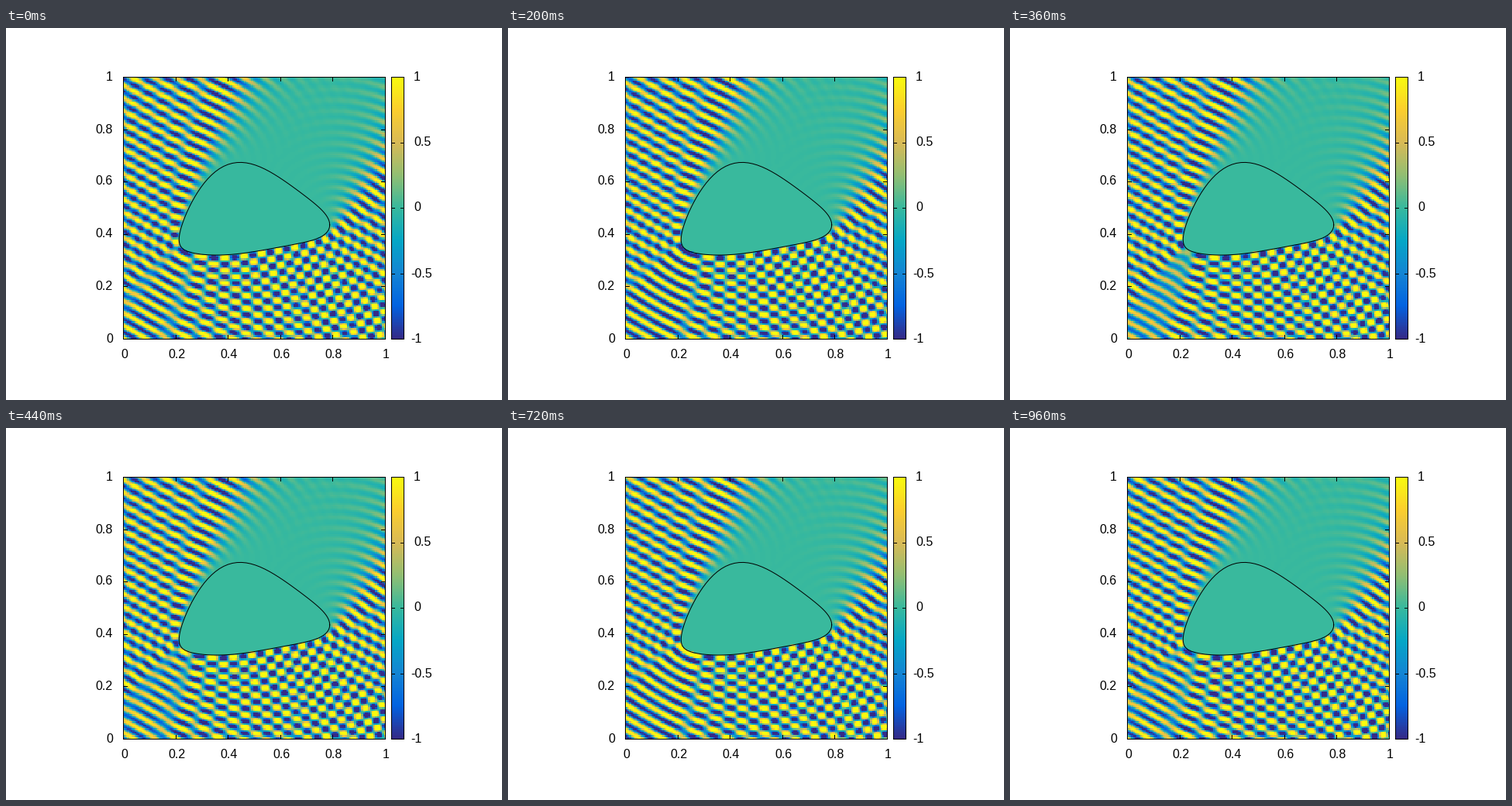
Recreate the animation shown at these times as a matplotlib script. Size 640 by 480 pixels, loop 1 s.

```python
import numpy as np
import matplotlib.pyplot as plt
from matplotlib.animation import FuncAnimation
from matplotlib.colors import LinearSegmentedColormap

W, H, DPI = 640, 480, 100
FRAMES, INTERVAL = 25, 40
LEFT, RIGHT, TOP, BOTTOM = 151.5, 489.5, 63.5, 401.5
BAR_LEFT, BAR_RIGHT = 497.5, 513.5
SIDE = RIGHT - LEFT
CELLS = 150
K = 150
ANGLE = np.pi / 3
INSET = 0.02

# Obstacle: an ellipse whose midline and height are cubics in c = cos(t)
HALF_WIDTH = 97.2 / SIDE
MIDLINE = np.array([17.3, -31, -7.8, 0]) / SIDE
HEIGHT = np.array([16.5, -11, -23.5, 56]) / SIDE
CENTRE = 0.5 + 0.5j


def outline(count):
    t = np.arange(count) * 2 * np.pi / count
    c = np.cos(t)
    y = np.polyval(MIDLINE, c) + np.polyval(HEIGHT, c) * np.sin(t)
    return CENTRE + HALF_WIDTH * c + 1j * y


def inside(z):
    z = z - CENTRE
    c = np.clip(z.real / HALF_WIDTH, -1, 1)
    reach = np.polyval(HEIGHT, c) * np.sqrt(1 - c * c)
    return np.abs(z.imag - np.polyval(MIDLINE, c)) < reach


def hankel(x):
    """Hankel function of the first kind, order zero."""
    nodes, weights = np.polynomial.hermite.hermgauss(10)
    total = sum(2 * w / np.sqrt(1 + 0.5j * v * v / x)
                for v, w in zip(nodes[5:], weights[5:]))
    return np.sqrt(2 / x) / np.pi * np.exp(1j * (x - np.pi / 4)) * total


def incident(z):
    return np.exp(1j * K * (z * np.exp(-1j * ANGLE)).real)


def total_field():
    """Plane wave plus its echo from a sound-soft obstacle."""
    edge, base = outline(640), outline(320)
    tangent = np.roll(base, -1) - np.roll(base, 1)
    sources = base + INSET * 1j * tangent / np.abs(tangent)

    def waves(points):
        return hankel(K * np.abs(points[:, None] - sources))

    strength = np.linalg.lstsq(waves(edge), -incident(edge), rcond=1e-10)[0]
    axis = (np.arange(CELLS) + 0.5) / CELLS
    z = axis + 1j * axis[:, None]
    field = np.zeros(z.shape, complex)
    for row, points in enumerate(z):
        out = ~inside(points)
        field[row, out] = incident(points[out]) + waves(points[out]) @ strength
    return field


def line(xs, ys):
    ax.plot(xs, H - np.asarray(ys), color="black", lw=0.72, snap=False,
            solid_capstyle="projecting", solid_joinstyle="miter")


def box(x0, x1):
    line([x0, x1, x1, x0, x0], [TOP, TOP, BOTTOM, BOTTOM, TOP])


def ticks_across(x0, x1, y, size):
    line([x0, x0 + size], [y, y])
    line([x1 - size, x1], [y, y])


def label(x, y, text, ha):
    ax.text(x, H - y, text, ha=ha, va="center_baseline", fontsize=11.52,
            family="Liberation Sans", color="black")


parula = LinearSegmentedColormap.from_list("parula", [
    "#352a87", "#0363e1", "#1485d4", "#06a7c6", "#38b99e",
    "#92bf73", "#d9ba56", "#fcce2e", "#f9fb0e"], N=256)

fig = plt.figure(figsize=(W / DPI, H / DPI), dpi=DPI, facecolor="white")
ax = fig.add_axes([0, 0, 1, 1])
ax.axis("off")

field = total_field()
style = dict(cmap=parula, vmin=-1, vmax=1, origin="lower", aspect="auto",
             interpolation="nearest")
picture = ax.imshow(field.real, extent=[LEFT, RIGHT, H - BOTTOM, H - TOP], **style)
ax.imshow(np.linspace(-1, 1, 256)[:, None],
          extent=[BAR_LEFT, BAR_RIGHT, H - BOTTOM, H - TOP], **style)
ax.set(xlim=(0, W), ylim=(0, H))

curve = outline(101)
curve = np.append(curve, curve[0])
line(LEFT + SIDE * curve.real, BOTTOM - SIDE * curve.imag)

box(LEFT, RIGHT)
box(BAR_LEFT, BAR_RIGHT)
for i in range(6):
    x = np.floor(LEFT + SIDE * i / 5) + 0.5
    y = np.floor(BOTTOM - SIDE * i / 5) + 0.5
    ticks_across(LEFT, RIGHT, y, 5)
    line([x, x], [TOP, TOP + 5])
    line([x, x], [BOTTOM - 5, BOTTOM])
    label(138, y - 2, f"{i / 5:g}", "right")
    label(x + 1, 420, f"{i / 5:g}", "center")
for i in range(5):
    value = 1 - i / 2
    y = np.floor(TOP + SIDE * i / 4) + 0.5
    ticks_across(BAR_LEFT, BAR_RIGHT, y, 4)
    label(526 if value >= 0 else 522, y - 2, f"{value:g}", "left")


def update(frame):
    picture.set_data((field * np.exp(-2j * np.pi * frame / FRAMES)).real)
    return [picture]


anim = FuncAnimation(fig, update, frames=FRAMES, interval=INTERVAL, repeat=True)
plt.show()
```
